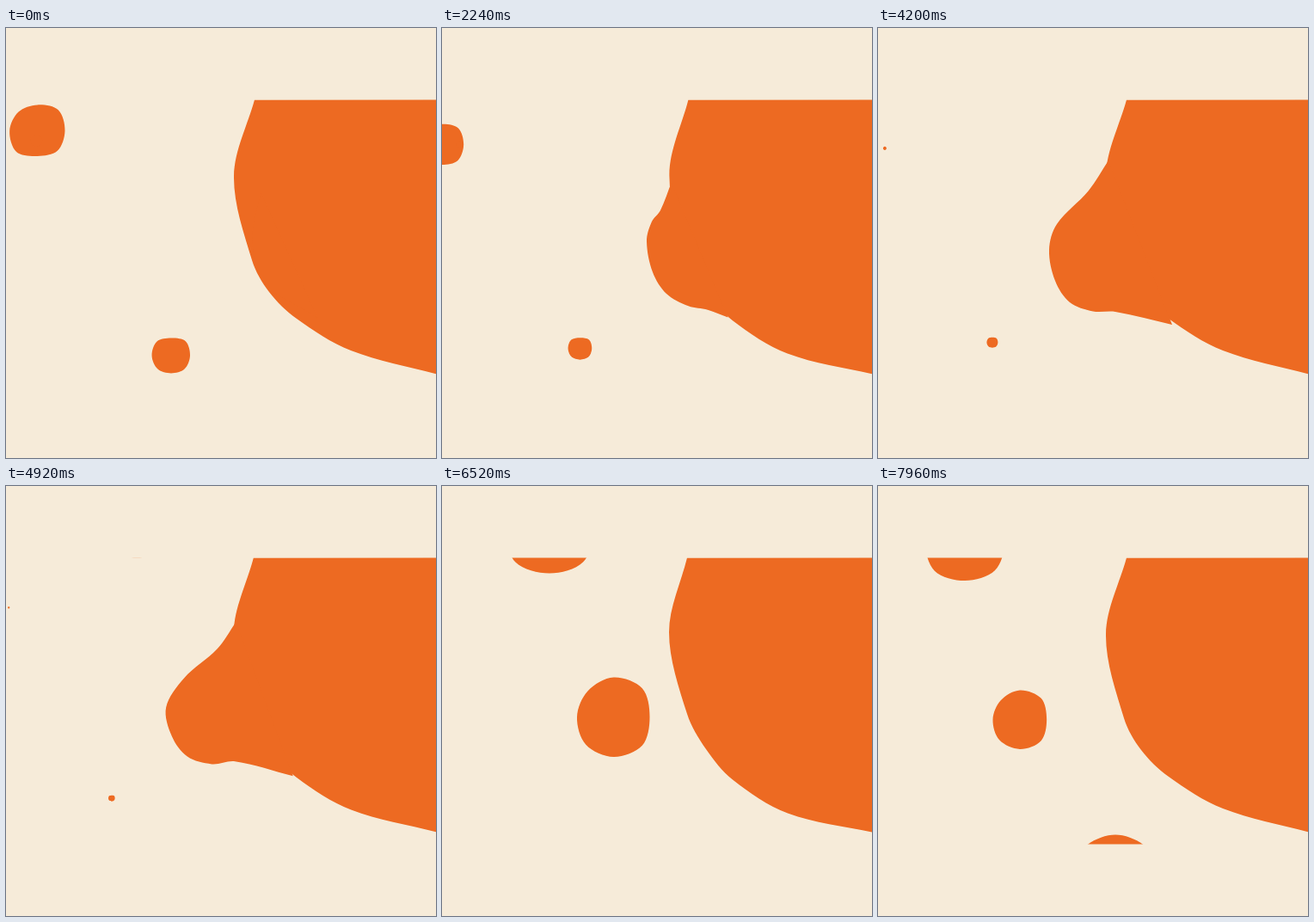
Recreate the animation shown at these times as an HTML page. Size 500 by 500 pixels, loop 8 s.

```html
<!DOCTYPE html>
<html lang="en">
<head>
<meta charset="utf-8">
<title>Liquid blobs</title>
<style>
  html, body { margin: 0; height: 100%; overflow: hidden; background: #f6ebd9; }
  svg { display: block; width: 100%; height: 100%; }
</style>
</head>
<body>
<svg viewBox="0 0 500 500">
  <clipPath id="band"><rect y="83.4" width="500" height="333.2"/></clipPath>
  <g id="liquid" clip-path="url(#band)" fill="#ed6a22">
    <path id="body"/>
    <path id="bulge"/>
  </g>
</svg>
<script>
const LOOP = 8000, STEP = 40, SPLIT = 6320;

const bodyRound = [289,83.5, 265,172, 286,270, 306,307, 338,338, 401,375, 505,403.5];
const bodyFull = [285,83.5, 264,170, 285,265, 307,306, 338,341.5, 402,380.5, 505,403.5];
const fullness = [[0, 0], [1360, .5], [3120, .8], [4200, 0], [5680, .6], [6520, 1], [7960, 0]];

// Outline of the swelling from its upper to its lower corner: [time, x, y, ...]
const bulge = [
  [1360, 267.5,191, 260,221, 258.5,230, 257,243, 262,278, 277,303, 302,319, 318,328, 334,338],
  [3120, 266,168, 248,203, 229,221, 219,253, 228,290, 245,315, 271,327.5, 300,327.5, 331,335],
  [4200, 268,154, 245,189, 208,228, 199,258, 206,294, 223,319, 250,329.5, 276,330, 342,345],
  [5680, 267,162, 246,190, 206,218.5, 172.5,257, 179,288, 198,310, 228,317, 256,310, 325,329],
  [SPLIT, 268,205, 254,250, 213,220, 161,266, 166,290, 181,308, 208,315, 255,283, 298,293]
];
// It starts hidden inside the body.
bulge.unshift([0, ...bulge[0].slice(1).map((v, i) => i % 2 ? v : v + 29)]);

// Relative radii at every 45 degrees, clockwise from the right.
const tall = [.955, 1.07, 1.057, 1.035, .966, .966, 1.045, 1.07];
const wide = [1, 1.03, .92, 1.08, 1.01, .97, .94, 1.07];
const small = [1, 1, .93, 1, 1.02, 1.06, .93, 1.08];
const boxy = [1, 1.06, 1, 1.07];
const round = [1, 1];

// Each move is a list of [time, x, y, radius].
const blobs = [
  { radii: wide, from: 0, to: 4000, move: [[0, 36.5,119.5,32], [1360, 14,130,28.2], [4000, -29,147,20]] },
  { radii: small, from: 0, to: 5800, move: [[0, 192,381,22], [5800, 110.5,360,.5]] },
  { radii: round, from: 0, to: 5600, move: [[0, 35.2,131,7.2], [5600, -1.2,142.8,.3]] },
  { radii: tall, from: SPLIT, to: LOOP, move: [[SPLIT, 207,267.5,46.5], [6520, 199.5,268.5,44], [7960, 165,271.5,32.6]] },
  { radii: boxy, from: 4900, to: LOOP, move: [[4900, 153,8,75], [5680, 137,28.5,64], [6520, 125,49.5,52], [7960, 101,63.5,46.5]] },
  { radii: round, from: 7000, to: LOOP, move: [[7000, 287,469,52], [7960, 276,457.5,52]] }
];

const mix = (a, b, k) => a.map((v, i) => v + (b[i] - v) * k);

function sample(track, t) {
  const n = track.findIndex(key => key[0] > t);
  if (n < 0) return track[track.length - 1].slice(1);
  const a = track[n - 1], b = track[n];
  return mix(a, b, (t - a[0]) / (b[0] - a[0])).slice(1);
}

// Smooth curve through the points, handles scaled to segment length.
function curve(values, closed) {
  const pts = [];
  for (let i = 0; i < values.length; i += 2) pts.push([values[i], values[i + 1]]);
  const n = pts.length;
  const at = i => closed ? pts[(i + n) % n] : pts[Math.max(0, Math.min(n - 1, i))];
  const dist = (a, b) => Math.hypot(a[0] - b[0], a[1] - b[1]);
  const handle = (i, dir) => {
    const p = at(i), prev = at(i - 1), next = at(i + 1);
    const k = dir * dist(p, at(i + dir)) / (dist(prev, p) + dist(p, next) || 1) / 3;
    return [p[0] + (next[0] - prev[0]) * k, p[1] + (next[1] - prev[1]) * k];
  };
  let d = "M" + pts[0];
  for (let i = 0; i < (closed ? n : n - 1); i++) {
    d += "C" + [handle(i, 1), handle(i + 1, -1), at(i + 1)].join(" ");
  }
  return d;
}

function blobPath(radii, [x, y, r]) {
  const values = [];
  for (let i = 0; i < 8; i++) {
    const angle = i * Math.PI / 4, reach = r * radii[i % radii.length];
    values.push(x + reach * Math.cos(angle), y + reach * Math.sin(angle));
  }
  return curve(values, true) + "Z";
}

const liquid = document.getElementById("liquid");
const setPath = (path, d) => path.setAttribute("d", d);
const body = document.getElementById("body");
const swelling = document.getElementById("bulge");
for (const blob of blobs) {
  blob.path = document.createElementNS(liquid.namespaceURI, "path");
  liquid.append(blob.path);
}

function draw(t) {
  const [full] = sample(fullness, t);
  setPath(body, curve(mix(bodyRound, bodyFull, full)) + "V83Z");
  setPath(swelling, t < SPLIT ? curve(sample(bulge, t)) + "Z" : "");
  for (const { path, radii, from, to, move } of blobs) {
    setPath(path, t >= from && t < to ? blobPath(radii, sample(move, t)) : "");
  }
}

const start = performance.now();
function tick() {
  const t = (performance.now() - start) % LOOP;
  draw(Math.floor(t / STEP) * STEP);
  requestAnimationFrame(tick);
}
tick();
</script>
</body>
</html>
```
